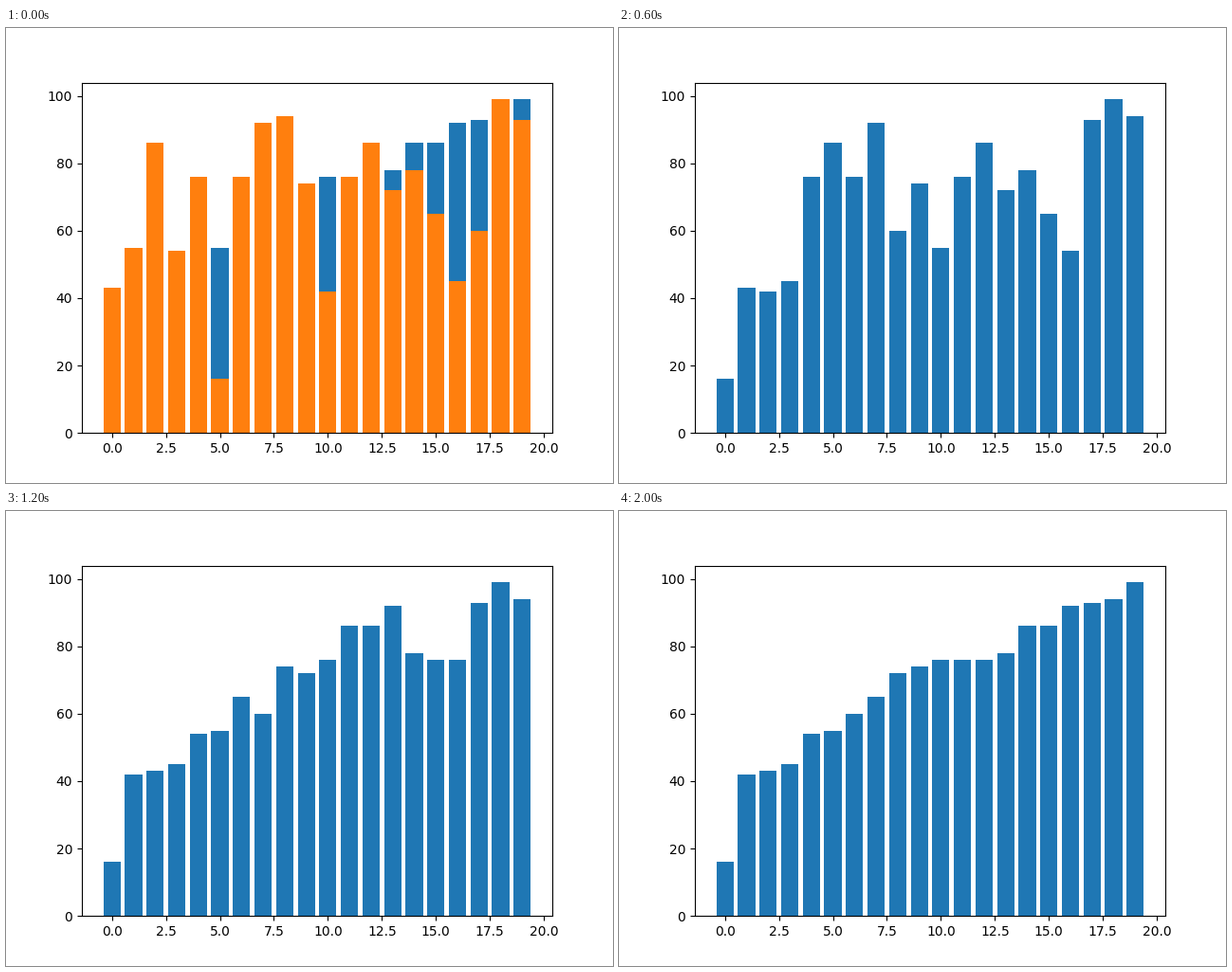
A matplotlib script for the animation above (2100 ms loop, 640 by 480 pixels).

```python
import matplotlib.pyplot as plt
from matplotlib.animation import FuncAnimation

START = [43, 55, 86, 54, 76, 16, 76, 92, 94, 74,
         42, 76, 86, 72, 78, 65, 45, 60, 99, 93]
LONG_SPAN = 16


def pivot_index(a, lo, hi):
    """Last item for long spans, median of three for the rest."""
    if hi - lo >= LONG_SPAN:
        return hi
    return sorted((lo, (lo + hi) // 2, hi), key=lambda k: a[k])[1]


def quicksort(a, lo, hi):
    """Sort in place, yielding a copy after every exchange."""
    if lo >= hi:
        return
    p = pivot_index(a, lo, hi)
    a[p], a[hi] = a[hi], a[p]
    pivot, i, j = a[hi], lo, hi - 1
    while True:
        while a[i] < pivot:
            i += 1
        while j > i and a[j] >= pivot:
            j -= 1
        if i >= j:
            break
        a[i], a[j] = a[j], a[i]
        yield list(a)
    a[i], a[hi] = a[hi], a[i]
    yield list(a)
    yield from quicksort(a, lo, i - 1)
    yield from quicksort(a, i + 1, hi)


# Keep only the exchanges that visibly change the chart.
states = [START]
for state in quicksort(list(START), 0, len(START) - 1):
    if state != states[-1]:
        states.append(state)

fig, ax = plt.subplots(figsize=(6.4, 4.8), dpi=100)
slots = range(len(START))
bars = ax.bar(slots, states[-1], color="C0")
overlay = ax.bar(slots, START, color="C1")


def draw(frame):
    # The loop opens with the unsorted bars laid over the sorted ones.
    opening = frame == 0
    heights = states[-1] if opening else states[frame]
    for bar, cover, height in zip(bars, overlay, heights):
        bar.set_height(height)
        cover.set_visible(opening)
    return [*bars, *overlay]


anim = FuncAnimation(fig, draw, frames=len(states), interval=100,
                     repeat=True, repeat_delay=0, blit=False)
plt.show()
```
